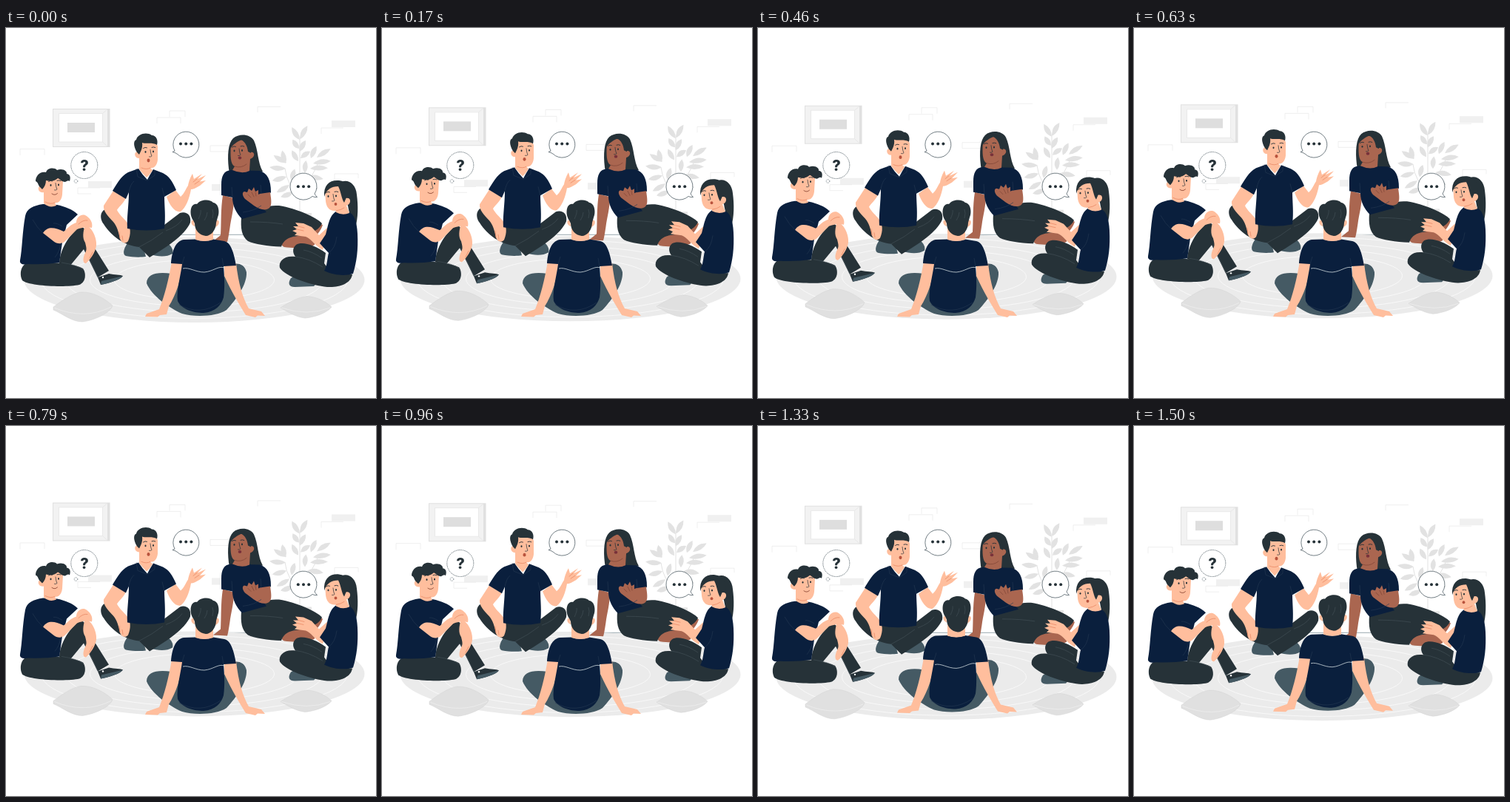
Animation, 500 px wide and 500 px high, one loop 1.54 s. Source, as an HTML page:

```html
<!DOCTYPE html>
<html lang="en">
<head>
<meta charset="utf-8">
<title>Group talk</title>
<style>
html, body { margin: 0; width: 100%; height: 100%; overflow: hidden; background: #fff; }
svg { display: block; width: 100vw; height: 100vh; }
.navy { fill: #0a1f3d; }
.dark { fill: #263238; }
.slate { fill: #455a64; }
.skin { fill: #ffbe9d; }
.brown { fill: #aa6650; }
.line { fill: none; stroke: #263238; stroke-width: .9; stroke-linecap: round; }
.fold { fill: none; stroke: #263a52; stroke-width: .6; }
.crease { fill: none; stroke: #45525a; stroke-width: .6; }
.soft { fill: none; stroke: #e5835f; stroke-width: .7; stroke-linecap: round; }
.bubble { fill: #fff; stroke: #37474f; stroke-width: .7; }
.mark { font: 800 20px Inter, Lato, sans-serif; fill: #263238; text-anchor: middle; }
.brick { fill: none; stroke: #e9e9e9; stroke-width: .7; }
.cushion { fill: #e0e0e0; stroke: #d3d3d3; stroke-width: .5; }
</style>
</head>
<body>
<svg viewBox="0 0 500 500">
<defs>
  <g id="face">
    <path class="line" d="M-8.5-5q2.500-2 5-.7M3-6.200q2.500-1 4.800.2"/>
    <g class="dark"><ellipse cx="-5.500" cy="0" rx="1" ry="1.400"/><ellipse cx="5" cy="-.5" rx="1" ry="1.400"/></g>
    <path class="line" style="stroke-width:.7" d="M1-3Q1.500 3 3 5.500Q2 7-.5 6.500"/>
  </g>
  <g id="dots" class="dark"><circle cx="-7.200" r="2"/><circle r="2"/><circle cx="7.200" r="2"/></g>
</defs>
<rect width="500" height="500" fill="#fff"/>
<path d="M236 279.300H325" stroke="#546e7a" stroke-width=".6"/>

<g id="room">
  <path fill="#e0e0e0" d="M63 109H140.500V161H63Z"/>
  <path fill="#f2f2f2" d="M64 110H137V160H64Z"/>
  <path fill="#fff" stroke="#e2e2e2" stroke-width=".7" d="M71.500 115.500H130.500V154H71.500Z"/>
  <path stroke="#e2e2e2" stroke-width=".7" d="M130.500 115.500L137 110M130.500 154L137 160"/>
  <rect x="83" y="128" width="37" height="13" fill="#dedede"/>
  <path fill="#f0f0f0" d="M440 125h32v9h-32zM111 207h32v9h-32zM278 211h32v9h-32z"/>
  <path fill="#e5e5e5" d="M394 250h19v10h-19z"/>
  <path class="brick" d="M204 129v-8h32v8M221 120v-8h21v8M340 114v-7.500h31M426 143v-8h30M19 172v-8.500h33v8M97 224v-8h30M97 224h18M276 167v-8h28M276 167h25M444 206v-9h32v6"/>
  <g id="plant" fill="#e2e2e2">
    <path fill="none" stroke="#e2e2e2" d="M397 262V150M397 225Q380 214 377 190M397 225Q412 205 423 180M397 150L399 143"/>
  </g>
  <ellipse cx="254.500" cy="340.500" rx="230" ry="57.500" fill="#ebebeb"/>
  <g id="rings" fill="none" stroke="#fafafa" stroke-width=".9"></g>
  <path class="cushion" d="M64 377C76 368 89 359 101 357C117 356 133 365 144 375C142 384 121 395 103 397C89 397 76 386 64 381Z"/>
  <path class="cushion" d="M371 378C383 370 395 364 406 362.500C420 363 433 370 440 377C434 385 417 391 404 392C393 391 381 384 371 378Z"/>
  <path fill="none" stroke="#efefef" stroke-width=".7" d="M65 378Q106 395 142 377M372 378Q407 390 438 378"/>

  <!-- man in the middle -->
  <path class="slate" d="M164 291C159 298 157 306 162 308C172 310 182 310 189 309L185 294ZM195 306L214 290C222 291 227 299 225 305C217 310 205 309 195 306Z"/>
  <path class="dark" d="M137 244C127 246 126 257 132 265C143 282 160 294 180 296L194 310C216 297 242 280 249 263C251 252 243 247 235 250L214 266L164 270L150 258Z"/>
  <path class="crease" d="M180 296Q198 287 212 276M216 274Q232 268 238 259"/>
  <path class="skin" d="M217 228L229 219L236 228C241 224 243 217 246 213C247 207 250 200 252 197L254 204L265 197L259 204L270 199L262 207.500L270 206L262 213C257 216 253 218 250 218C248 230 243 243 236 248C229 250 221 240 217 228Z"/>
  <path class="skin" d="M145 220L162 230C158 238 152 242 150 246C153 252 159 257 163 262C169 268 169 279 165 288C162 292 156 291 154 285C152 275 150 268 145 262C138 255 131 247 132 240Z"/>
  <path class="soft" d="M154 284L153 276M158 287L157 281M261 207L255 211M258 204L253 208"/>
  <path class="navy" d="M179 190L165 195C155 200 149 212 144 220L162 231L166 222C166 240 163 256 164 271Q190 276 214 271C216 255 214 240 214 228L230 219C225 207 220 200 212 196L199 191Q194 199 191 205Q184 198 179 190Z"/>
  <path class="fold" d="M166 222Q168 211 173 207M214 228L211 216M176 190L178 201L191 206L201 199L201 192"/>
  <path class="skin" d="M178 158C181 151 203 150 205 160L205 178C204 187 199 190 195 189L198 192Q194 199 190 202Q184 196 180 191L180 176C173 176 172 166 179 167Z"/>
  <path class="dark" d="M177 168C172 160 172 152 176 151C178 143 190 140 197 145C203 145 206 152 204 158C198 154 190 157 184 155C185 162 182 167 180 171Z"/>
  <use href="#face" x="194" y="167.500"/>
  <ellipse cx="192.500" cy="179" rx="2" ry="2.400" fill="#b9533d"/>
  <path class="soft" d="M183 189Q190 192 195 189"/>

  <!-- woman on the right of him -->
  <path class="brown" d="M384 279C374 285 368 292 376 296C390 298 409 297 417 293L417 284C421 278 426 273 428 266L414 261Z"/>
  <path class="dark" d="M318 256C325 248 345 240 369 240C393 244 420 256 427 264C423 275 405 280 388 282C379 284 374 289 372 295.500C354 295 335 292 327 288C318 281 317 270 318 256Z"/>
  <path class="crease" d="M388 282Q400 274 402 265M330 262Q355 262 374 265"/>
  <path class="brown" d="M293 226L308 230C308 245 304 258 302.500 270C301 280 300 286 299 289L280 288L290 280C291 265 290 245 293 226Z"/>
  <path class="dark" d="M301 190C299 172 300 156 307 149C315 142 330 143 335 152C341 165 340 182 347 194L333 197L302 196Z"/>
  <path class="navy" d="M304 192C294 193 291 200 291 212L291 226L306 229C306 240 311 250 319 258L352 249L345 240L358 222C358 205 353 196 343 193Z"/>
  <path class="brown" d="M343 224L357 222C358 230 360 239 356 243C352 247 343 246 335 240L323 231C319 226 319 222 322 221L326 222L328 217L332 220L335 215L337 221L341 219L341 225Z"/>
  <path class="fold" d="M306 229L305 215M345 224L344 212M320 249Q336 247 345 240"/>
  <path class="soft" style="stroke:#7d4435" d="M327 225L331 229M332 222L335 228M337 222L338 227"/>
  <path class="brown" d="M304 158C307 150 325 149 328 158L330 168C337 166 337 175 330 177L329 193Q319 198 306 192L309 187C303 184 303 172 304 158Z"/>
  <path class="dark" d="M303 163C302 154 310 148 318 148C327 149 331 158 331 169L327 167C326 159 323 154 318 151C312 154 307 157 303 163Z"/>
  <use href="#face" x="314" y="166"/>
  <ellipse cx="316" cy="175.500" rx="2.300" ry="2" fill="#78313a"/>
  <path class="soft" style="stroke:#7d4435" d="M309 187Q318 190 325 184"/>

  <!-- man on the left -->
  <path class="dark" d="M72 318C73 300 84 281 99 269C106 267 110 276 112 285L139 328L124 337L105 299L86 322Z"/>
  <path class="dark" d="M30 317C19 320 18 334 22 341C30 349 82 351 99 347C109 343 108 330 104 325C92 319 72 316 30 317Z"/>
  <path class="crease" d="M75 317Q96 320 105 327M124 337L107 300"/>
  <path class="dark" d="M124 337L139 332C147 334 155 333 158 335C154 341 137 345 128 347Z"/>
  <path class="slate" d="M129 342L158 335C153 341 138 345 128 347Z"/>
  <circle cx="131" cy="337" r="1.200" fill="#fff"/>
  <path class="skin" d="M107 266C117 269 123 285 122 294C121 303 114 313 108 318C103 318 104 310 107 304C110 299 108 295 107 290C103 284 104 275 107 266Z"/>
  <path class="navy" d="M50 238C37 240 28 244 26 254C22 275 22 299 19 314C18 320 25 320 30 319Q52 320 72 317L76 290L82 266L97 252C90 245 79 241 69 239Z"/>
  <path class="skin" d="M50 277C57 267 66 270 78 275C83 271 88 265 95 263C95 257 100 251 107 253C113 256 118 263 116 270C108 268 101 270 96 272L81 287C77 292 70 293 64 288Z"/>
  <path class="soft" d="M98 265Q104 259 110 260M113 311L117 303"/>
  <path class="fold" d="M76 268Q68 263 64 264M36 259Q42 270 50 277M75 290Q72 303 66 310"/>
  <path class="skin" d="M49 205C54 198 75 198 77 207L76 225C75 235 69 237 66 236L68 240Q59 244 51 237L51 222C43 224 41 213 48 213Z"/>
  <path class="dark" d="M46 215C43 212 44 209 40 207C40 200 46 193 54 195C56 189 65 188 69 192C76 189 83 193 82 197C88 198 87 204 86 207C84 205 82 207 80 208C75 208 73 204 70 203C65 208 58 207 54 206C54 211 52 215 49 218Z"/>
  <use href="#face" x="66" y="212.500"/>
  <path class="line" style="stroke:#8d4936" d="M62 224Q66 227 69.500 223.500"/>
  <path class="soft" d="M53 235Q60 239 66 236"/>

  <!-- woman on the far right -->
  <path class="slate" d="M385 338C380 346 383 350 390 350L416 349C420 346 418 342 412 339L392 334Z"/>
  <path class="dark" d="M432 304C417 293 400 288 392 293C386 298 388 305 391 309C375 307 368 316 370 324C378 336 408 346 430 349.500C446 352 466 347 468 333C450 333 436 328 430 318Z"/>
  <path class="crease" d="M391 309Q409 311 428 323M402 300Q414 302 427 311"/>
  <path class="dark" d="M450 210C460 202 473 210 474 225C476 240 476 257 472 270C468 263 464 252 462 240Z"/>
  <path class="skin" d="M434 283L428 300C418 295 412 284 405 282L390 280L393 277L387 274L393 272L388 268L395 268L391 263L402 264L413 269L423 280L434 270Z"/>
  <path class="soft" d="M393 272L402 274M395 268L403 270"/>
  <path class="navy" d="M446 248C436 254 435 270 432 279L424 291L436 304C434 312 434 322 430 328C444 335 460 335 469 332C474 315 476 300 475 278C474 260 470 251 463 249Z"/>
  <path class="fold" d="M436 304Q445 298 447 282"/>
  <path class="skin" d="M431 219C434 209 452 209 456 218L459 230C467 228 467 238 460 240L464 250Q455 254 446 249L446 247C437 248 433 242 432 234Z"/>
  <path class="dark" d="M430 228C429 212 437 205 450 206C461 207 466 217 464 230L460 229L457 236C453 230 453 222 449 214C440 214 433 218 430 228Z"/>
  <use href="#face" x="441" y="227.500"/>
  <ellipse cx="445.500" cy="238" rx="1.900" ry="2" fill="#b9533d"/>
  <path class="soft" d="M446 247Q453 246 457 243"/>
</g>

<g id="front">
  <path class="slate" d="M224 332C205 329 190 332 190 345C197 362 220 378 238 386C255 391 285 390 298 381C312 366 326 346 325 330C322 318 312 317 304 320L290 345L240 345Z"/>
  <path class="skin" d="M224 315L239 317C237 340 229 362 220 376L217 387L208 388L205 390.500L188 390L190 386L207 380C214 363 220 340 224 315ZM295 318L311 318C314 345 320 365 328 379L345 383L350 389L340 388.500L337 391L324 388C316 375 304 355 295 335Z"/>
  <path class="navy" d="M240 286C228 288 224 304 223 318L238 319C236 335 230 355 232 369C238 381 254 385 267 385C282 384 291 375 294 364C296 350 295 335 294 322L311 321C308 304 304 290 295 288L280 285.500Q268 290 256 285.500Z"/>
  <path class="fold" d="M234 374Q262 390 290 371M238 319L241 309M294 322L292 311"/>
  <path d="M239 325C248 323 256 330 268 330C280 329 287 321 295 324" fill="none" stroke="#cfd8dc" stroke-width=".8"/>
  <path class="skin" d="M256 268L280 268L280 286Q268 290 256 286Z"/>
  <path class="skin" d="M283 260C289 257 290 266 283 269ZM254 260C249 258 249 266 255 268Z"/>
  <path class="dark" d="M253 260C247 252 249 236 258 238C263 231 276 231 280 236C288 237 289 250 286 256L284 263C284 273 277 281 270 281C261 280 255 273 255 264Z"/>
  <path class="crease" d="M260 258Q264 250 263 246M268 260Q272 254 272 249M279 257Q281 250 279 245"/>
</g>

<g id="talk">
  <circle class="bubble" cx="105.800" cy="185.500" r="18" stroke-dasharray="1.500 .8"/>
  <circle class="bubble" cx="94.500" cy="207" r="2.300" stroke-dasharray="1 1"/>
  <text class="mark" x="106" y="193">?</text>
  <path class="bubble" d="M228 166A17.500 17.500 0 1 1 231 170Q228 168 225 167.500Q227 167 228 166Z"/>
  <use href="#dots" x="243.200" y="156.500"/>
  <path class="bubble" d="M417 224A18 18 0 1 0 414 227.500Q417 229 420.500 228.500Q418 226 417 224Z"/>
  <use href="#dots" x="402" y="214.300"/>
</g>
</svg>
<script>
const NS = 'http://www.w3.org/2000/svg';
const byId = id => document.getElementById(id);
function add(parent, tag, attrs) {
  const el = document.createElementNS(NS, tag);
  for (const key in attrs) el.setAttribute(key, attrs[key]);
  parent.append(el);
}

// Leaves: base x, base y, direction in degrees, length
const leaves = [
  [397, 151, -122, 20], [398, 150, -62, 20], [396, 163, -125, 15], [397, 167, -62, 17],
  [395, 180, -120, 17], [398, 176, -35, 16], [379, 182, -150, 20], [378, 190, -175, 22],
  [378, 183, -105, 18], [379, 201, 165, 20], [383, 212, 150, 20], [386, 207, -75, 17],
  [420, 175, -32, 22], [415, 183, -8, 24], [411, 190, -2, 24], [407, 201, 8, 22],
  [412, 176, -65, 18], [404, 196, -85, 17], [388, 222, 160, 18], [404, 214, 10, 18]
];
for (const [x, y, turn, len] of leaves) {
  add(byId('plant'), 'path', {
    d: `M0 0Q${len * .5}-8 ${len} 0Q${len * .5} 6 0 0Z`,
    transform: `translate(${x} ${y}) rotate(${turn})`
  });
}
for (const rx of [207, 174, 141, 108]) {
  add(byId('rings'), 'ellipse', { cx: 254.5, cy: 340.5, rx, ry: rx / 4 });
}

const LOOP = 1540, STEP = 1000 / 24;
const roomPath = [[0, 0], [170, -1.7], [460, -4.3], [630, -5.7], [720, -5.9],
  [960, -4.8], [1170, -2.5], [1500, .2], [LOOP, 0]];
const frontPath = [[0, 0], [1080, 0], [1170, -.9], [1500, -4.3], [LOOP, -4.5]];

function valueAt(path, t) {
  const i = path.findIndex(p => p[0] > t);
  const [t0, a] = path[i - 1], [t1, b] = path[i];
  return a + (b - a) * (t - t0) / (t1 - t0);
}
function shift(id, path, t) {
  byId(id).setAttribute('transform', `translate(0 ${valueAt(path, t).toFixed(2)})`);
}

const start = performance.now();
function draw() {
  const now = Math.max(0, performance.now() - start) % LOOP;
  const t = Math.min(36, Math.floor((now + 4) / STEP)) * STEP;
  shift('room', roomPath, t);
  shift('front', frontPath, t);
  requestAnimationFrame(draw);
}
draw();
</script>
</body>
</html>
```
